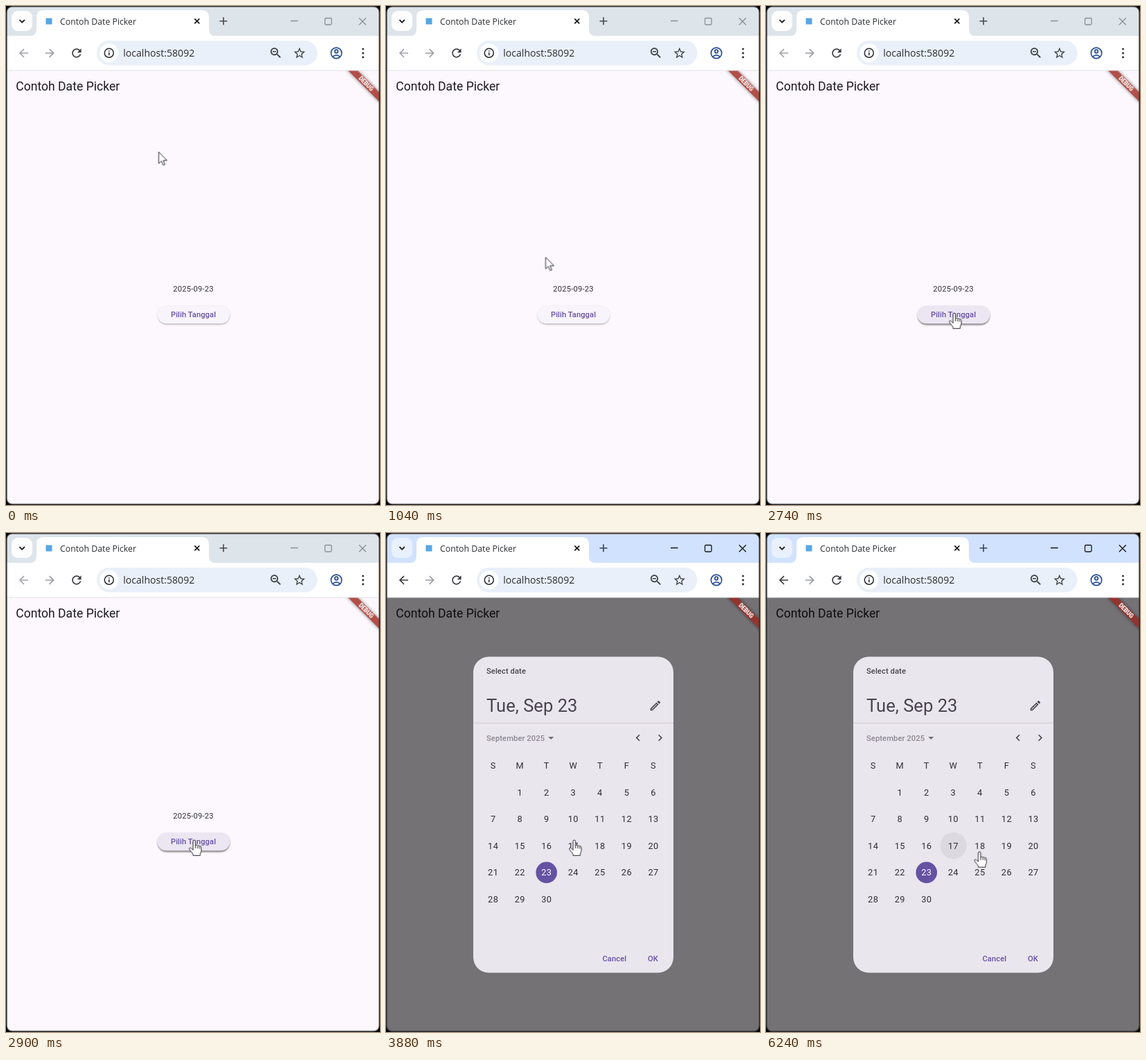
An HTML page that plays this animation: 540 by 720 pixels, repeating every 6340 ms.

```html
<!DOCTYPE html>
<html lang="id">
<head>
<meta charset="utf-8">
<title>Contoh Date Picker</title>
<style>
html, body { margin: 0; width: 100%; height: 100%; overflow: hidden; background: #000; }
svg { display: block; width: 540px; height: 720px; }
text { font-family: Roboto, sans-serif; font-size: 11.2px; }
.ui { font-family: "Open Sans", "Noto Sans", sans-serif; fill: #2b2d30; }
.label { font-weight: 500; letter-spacing: .08px; fill: #6750a4; }
.mid { text-anchor: middle; }
.day { font-size: 12.8px; letter-spacing: .4px; text-anchor: middle; fill: #302e34; }
.line { fill: none; stroke: currentColor; }
.icon { fill: currentColor; }

/* Everything shares one 6340 ms loop */
.bar, .chip, .ctl, .back, .plus, .ribbon, .veil, .press, .hover, .arrow, .hand, .pointer {
  animation: 6340ms step-end infinite;
}
.bar { animation-name: bar; }
.chip { animation-name: chip; }
.ctl { animation-name: ctl; }
.back { animation-name: back; }
.plus { animation-name: plus; }
.ribbon { animation-name: ribbon; }
.veil { animation-name: veil; }
.press { animation-name: press; }
.hover { animation-name: hover; }
.arrow { animation-name: arrow; }
.hand { animation-name: hand; }
.pointer { animation-name: pointer; }

/* The window takes focus at 3800 ms */
@keyframes bar { 0% { fill: #dde4ea } 59.936% { fill: #d1e2fe } }
@keyframes chip { 0% { fill: #fdfdfe } 59.936% { fill: #e9f1fe } }
@keyframes ctl { 0% { color: #8b9095 } 59.936% { color: #151618 } }
@keyframes back { 0% { color: #a2a5a9 } 59.936% { color: #3c3e42 } }
@keyframes plus { 0% { color: #46494d } 59.936% { color: #35445c } }
/* The dialog opens at 3880 ms */
@keyframes ribbon { 0% { fill: #b14f48 } 61.198% { fill: #93342e } }
@keyframes veil { 0% { opacity: 0 } 61.198% { opacity: 1 } }
@keyframes press { 0% { opacity: 0 } 23.974% { opacity: .5 } 25.236% { opacity: 1 } }
@keyframes hover { 0% { opacity: 0 } 63.721% { opacity: .5 } 64.983% { opacity: 1 } }
@keyframes arrow { 0% { opacity: 1 } 23.974% { opacity: 0 } }
@keyframes hand { 0% { opacity: 0 } 23.974% { opacity: 1 } }
@keyframes pointer {
  0% { transform: translate(220.5px, 210.5px) }
  1.261% { transform: translate(220.5px, 210.5px); animation-timing-function: steps(6) }
  8.832% { transform: translate(223px, 282px); animation-timing-function: steps(6) }
  16.403% { transform: translate(230.5px, 362.5px); animation-timing-function: steps(4) }
  21.450% { transform: translate(255px, 427px); animation-timing-function: steps(5) }
  27.759% { transform: translate(271.8px, 443px) }
  93.690% { transform: translate(275px, 444.5px) }
  96.529% { transform: translate(291px, 452px) }
  98.422%, 100% { transform: translate(308.2px, 459.8px) }
}
</style>
</head>
<body>
<svg viewBox="0 0 540 720">
  <defs>
    <clipPath id="win"><rect x="1" y="1" width="538" height="718" rx="8"/></clipPath>
    <clipPath id="page"><rect x="1" y="93" width="538" height="626"/></clipPath>
    <filter id="soft" x="-30%" y="-60%" width="160%" height="220%"><feGaussianBlur stdDeviation="1.1"/></filter>
    <filter id="glow" x="-20%" y="-100%" width="140%" height="300%"><feGaussianBlur stdDeviation="2.4"/></filter>
    <path id="prev" d="M15.41 7.41L14 6l-6 6 6 6 1.41-1.41L10.83 12z"/>
    <path id="left" d="M20 11H7.83l5.59-5.59L12 4l-8 8 8 8 1.41-1.41L7.83 13H20z"/>
  </defs>

  <g clip-path="url(#win)">
    <!-- tab strip -->
    <rect class="bar" width="540" height="44" fill="#dde4ea"/>
    <rect class="chip" x="8" y="7" width="30" height="29" rx="9" fill="#fdfdfe"/>
    <path class="line" d="M19.5 20l3.7 3.7 3.7-3.7" color="#202124" stroke-width="1.8"/>
    <path d="M34 43.5Q44 43.500 44 33V16Q44 6 54 6H283Q293 6 293 16V33Q293 43.500 303 43.500Z" fill="#fff"/>
    <rect x="57.500" y="17.500" width="9" height="9" fill="#57a7e4"/>
    <text class="ui" x="78" y="27" style="font-size:12.3px">Contoh Date Picker</text>
    <path class="line" d="M272.300 18.300l7 7m0-7l-7 7" color="#17181a" stroke-width="1.7"/>
    <path class="line plus" d="M308.500 21.800h11m-5.500-5.500v11" stroke-width="1.6"/>
    <g class="line ctl" stroke-width="1.3">
      <path d="M411 21.500h10.500"/>
      <rect x="460.500" y="17.500" width="9.500" height="9.500" rx="1.500"/>
      <path d="M509.800 17.300l10 10m0-10l-10 10"/>
    </g>

    <!-- toolbar -->
    <rect y="43" width="540" height="50" fill="#fff"/>
    <g class="icon">
      <use class="back" href="#left" transform="translate(15.600 58.200) scale(.82)"/>
      <use href="#left" transform="translate(73.100 58.200) scale(-.82 .82)" color="#9b9ea3"/>
      <g color="#3a3c40">
        <path transform="translate(92 58) scale(.83)" d="M17.650 6.350C16.200 4.900 14.210 4 12 4c-4.420 0-7.990 3.580-7.990 8s3.570 8 7.990 8c3.730 0 6.840-2.550 7.730-6h-2.080c-.82 2.330-3.040 4-5.650 4-3.310 0-6-2.690-6-6s2.690-6 6-6c1.660 0 3.140.69 4.220 1.780L13 11h7V4z"/>
        <circle cx="515.500" cy="62" r="1.600"/><circle cx="515.500" cy="67.900" r="1.600"/><circle cx="515.500" cy="73.800" r="1.600"/>
      </g>
    </g>
    <rect x="131" y="50" width="318.500" height="35.500" rx="17.750" fill="#e9f0f9"/>
    <circle cx="148.800" cy="67.800" r="13.700" fill="#fdfeff"/>
    <g class="line" color="#25272a" stroke-width="1.5">
      <circle cx="148.800" cy="67.800" r="6.500"/>
      <path d="M148.800 67v4.200m0-6.900v1.500"/>
    </g>
    <text class="ui" x="169.200" y="73" style="font-size:14.1px">localhost:58092</text>
    <g class="icon" color="#3d4044">
      <path transform="translate(379.400 57.700) scale(.85)" d="M15.500 14h-.79l-.28-.27C15.410 12.590 16 11.110 16 9.500 16 5.910 13.090 3 9.500 3S3 5.910 3 9.500 5.910 16 9.500 16c1.610 0 3.090-.59 4.230-1.570l.27.28v.79l5 4.990L20.490 19zm-6 0C7.010 14 5 11.990 5 9.500S7.010 5 9.500 5 14 7.010 14 9.500 11.990 14 9.500 14zM6.500 8.700h6v1.600h-6z"/>
      <path transform="translate(413.900 58.200) scale(.82)" d="M22 9.240l-7.190-.62L12 2 9.190 8.630 2 9.240l5.460 4.730L5.820 21 12 17.270 18.180 21l-1.630-7.030zM12 15.400l-3.760 2.270 1-4.280-3.320-2.880 4.380-.38L12 6.100l1.710 4.040 4.380.38-3.320 2.880 1 4.280z"/>
    </g>
    <g class="line" color="#264d95" stroke-width="1.7">
      <circle cx="477" cy="67.900" r="7.700"/>
      <circle cx="477" cy="65.500" r="2.300"/>
      <path d="M471.700 73.200q5.300-4.600 10.600 0"/>
    </g>

    <!-- page -->
    <rect y="93" width="540" height="627" fill="#fdf8fe"/>
    <text x="14.200" y="121.700" fill="#1d1b20" style="font-size:17.6px">Contoh Date Picker</text>
    <text class="mid" x="270.500" y="412" fill="#302e34" letter-spacing=".2">2025-09-23</text>
    <rect x="219" y="433.500" width="104" height="26" rx="13" fill="#000" opacity=".32" filter="url(#soft)"/>
    <rect x="218.500" y="432.300" width="104.800" height="26" rx="13" fill="#f8f4fb"/>
    <g class="press" opacity="0">
      <rect x="219" y="434.500" width="104" height="26" rx="13" fill="#000" opacity=".3" filter="url(#soft)"/>
      <rect x="218.500" y="432.300" width="104.800" height="26" rx="13" fill="#ece6f3"/>
    </g>
    <text class="label mid" x="270.500" y="449.300">Pilih Tanggal</text>

    <g class="veil" opacity="0">
      <rect y="93" width="540" height="627" fill="#000" opacity=".54"/>
      <rect x="126" y="178.500" width="289" height="456" rx="22.400" fill="#eae6ee"/>
      <text x="145" y="203" fill="#49454f" style="font-weight:500;letter-spacing:.08px">Select date</text>
      <text x="145" y="258" fill="#49454f" style="font-size:25.6px">Tue, Sep 23</text>
      <path class="line" d="M126 274.200H415" color="#cbc6d0" stroke-width="1"/>
      <g class="icon" color="#49454f">
        <path transform="translate(379.300 239.500) scale(.8)" d="M14.060 9.020l.92.92L5.920 19H5v-.92l9.060-9.060M17.660 3c-.25 0-.51.1-.7.29l-1.830 1.830 3.750 3.750 1.830-1.830c.39-.39.39-1.020 0-1.410l-2.340-2.340c-.2-.2-.45-.29-.71-.29zm-3.600 3.190L3 17.250V21h3.750L17.810 9.940z"/>
        <use href="#prev" transform="translate(354.200 285.900) scale(.8)"/>
        <use href="#prev" transform="translate(405.400 285.900) scale(-.8 .8)"/>
        <path d="M234.300 294h8l-4 4z" opacity=".75"/>
      </g>
      <text x="145" y="299.500" fill="#8b8791" style="font-weight:500;letter-spacing:.08px">September 2025</text>
      <circle class="hover" cx="270.700" cy="451.200" r="19.200" fill="#dcd9e0" opacity="0"/>
      <circle cx="231.700" cy="489.900" r="15.300" fill="#6552a2"/>
      <g id="days"></g>
      <text class="label" x="312.400" y="618">Cancel</text>
      <text class="label" x="378" y="618">OK</text>
    </g>

    <!-- corner ribbon -->
    <g clip-path="url(#page)">
      <g transform="translate(539 93) rotate(45)">
        <rect x="-34" y="22.400" width="68" height="9.600" fill="#000" opacity=".5" filter="url(#glow)"/>
        <rect class="ribbon" x="-34" y="22.400" width="68" height="9.600" fill="#b14f48"/>
        <text class="mid" y="30.100" fill="#fff" style="font-size:8.16px;font-weight:900">DEBUG</text>
      </g>
    </g>
    <path d="M0 93H540" stroke="#dfe1e6" stroke-width="1"/>
  </g>
  <rect x=".9" y=".7" width="538.200" height="718.400" rx="8" fill="none" stroke="#38383b" stroke-width="1.500"/>

  <g class="pointer" fill="#fff" stroke="#26262a" stroke-linejoin="round">
    <path class="arrow" d="M0 0V16.800L3.900 13.200 6.500 19.200 9 18.100 6.500 12.300H12Z"/>
    <path class="hand" opacity="0" d="M-1.800 14.500V1.800a1.800 1.800 0 0 1 3.600 0V8.200c.3-1.300 3-1.200 3.200.4 .5-1 2.600-.8 2.900.7 .6-.8 2.300-.4 2.300 1.200V15c0 2.500-1.600 3.500-1.600 5.200V22.300H-1.800V20.500C-2.800 18.500-5.800 16-7 13.200c-.8-1.600 1-2.800 2.300-1.600ZM1.800 8v4M5 8.800v3.400M7.900 9.500v3"/>
  </g>
</svg>
<script>
const days = document.getElementById('days');

function cell(label, col, row) {
  const el = document.createElementNS('http://www.w3.org/2000/svg', 'text');
  el.setAttribute('class', 'day');
  el.setAttribute('x', 154.7 + col * 38.55);
  el.setAttribute('y', 340 + row * 38.55);
  el.textContent = label;
  if (label === 23) el.style.fill = '#fff';
  days.append(el);
}

[...'SMTWTFS'].forEach((name, col) => cell(name, col, 0));
// The month starts on a Monday
for (let d = 1; d <= 30; d++) cell(d, d % 7, 1 + Math.floor(d / 7));
</script>
</body>
</html>
```
